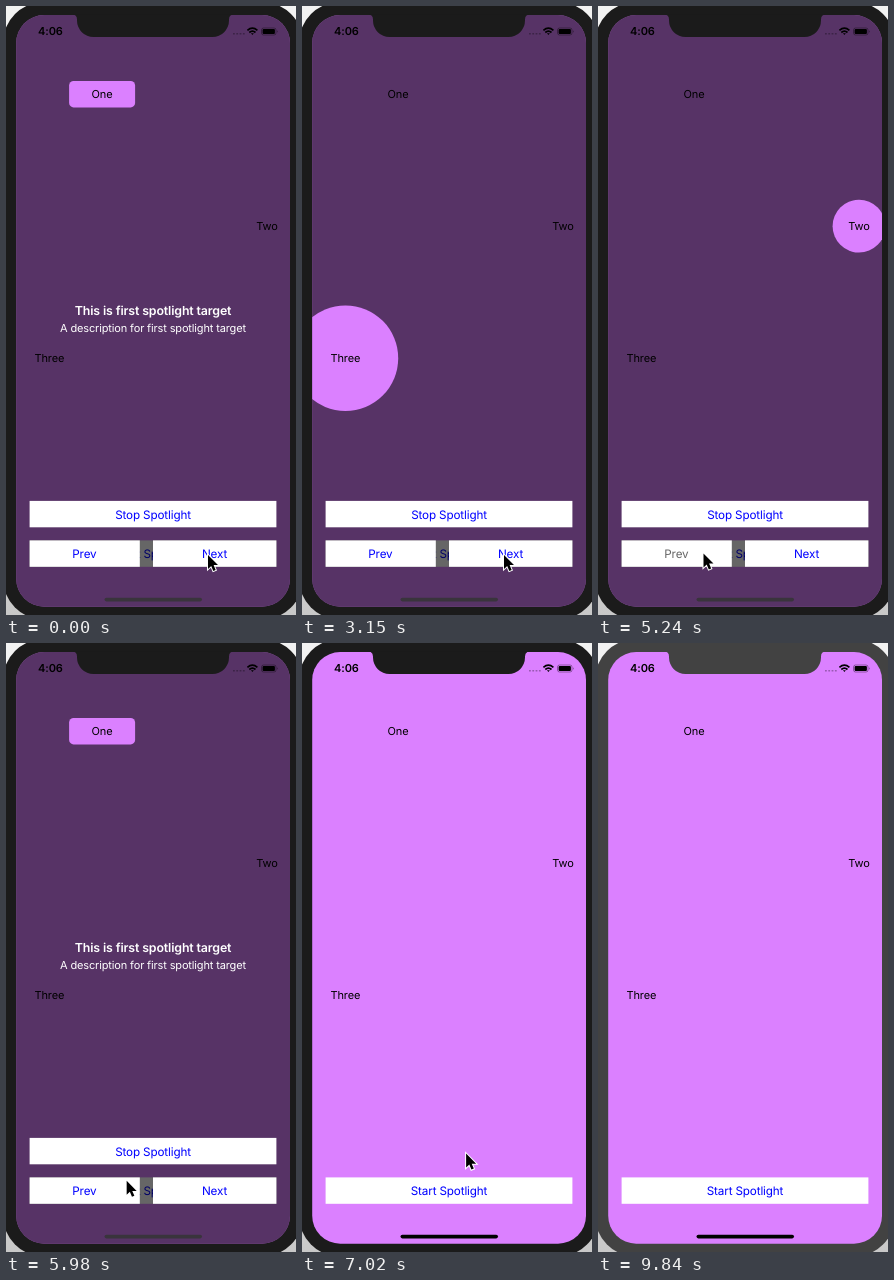
Recreate the animation shown at these times as an HTML page. Size 290 px wide and 609 px high, loop 9940 ms.

```html
<!DOCTYPE html>
<html lang="en">
<head>
<meta charset="utf-8">
<title>Spotlight tour</title>
<style>
  html, body { margin: 0; width: 100%; height: 100%; overflow: hidden; }
  body { background: linear-gradient(#f2f2f2 60%, #c8c8c8); }
  svg { display: block; width: 290px; height: 609px; }
  text { font: 11px Inter, Roboto, sans-serif; letter-spacing: -.14px; text-anchor: middle; text-rendering: geometricPrecision; }
  .button { font-size: 11.7px; fill: #00f; }
  .pressed { fill: #666; }
  .title { font-size: 12.4px; font-weight: 600; }
  .clock { font-weight: 600; }
</style>
</head>
<body>
<svg viewBox="0 0 290 609">
  <clipPath id="screen"><rect x="10.2" y="9" width="273.8" height="591.7" rx="28"/></clipPath>
  <rect id="bezel" x="-3" y="-4" width="300" height="617.5" rx="41"/>

  <g clip-path="url(#screen)">
    <rect width="290" height="609" fill="#db80ff"/>
    <rect x="23.6" y="534.4" width="246.8" height="26.4" fill="#fff"/>
    <text class="button" x="147" y="552.2">Start Spotlight</text>

    <g id="tour">
      <rect width="290" height="609" opacity=".6"/>
      <g fill="#db80ff">
        <rect id="spot1" x="63.1" y="75" width="66" height="26.4" rx="4.5"/>
        <circle id="spot2" cx="261" cy="220.2" r="26.4"/>
        <circle id="spot3" cx="43.4" cy="352.2" r="52.8"/>
      </g>
      <g id="caption" fill="#fff">
        <text class="title" x="147" y="309">This is first spotlight target</text>
        <text x="147" y="325.8">A description for first spotlight target</text>
      </g>
      <g fill="#fff">
        <rect x="23.6" y="494.9" width="246.8" height="26.4"/>
        <rect x="23.6" y="534.4" width="110.2" height="26.4"/>
        <rect x="147" y="534.4" width="123.4" height="26.4"/>
      </g>
      <text class="button" id="stop" x="147" y="512.5">Stop Spotlight</text>
      <text class="button" id="prev" x="78.4" y="552.2">Prev</text>
      <text class="button" id="next" x="208.5" y="552.2">Next</text>
    </g>

    <text x="96" y="92.3">One</text>
    <text x="261" y="224.2">Two</text>
    <text x="43.4" y="356.2">Three</text>
    <text class="clock" x="44.4" y="29.3">4:06</text>

    <path d="M227 27.7H239" stroke="#000" stroke-width="1.6" stroke-dasharray="1.8 1.5" opacity=".3"/>
    <g fill="none" stroke="#000" stroke-width="1.7">
      <path d="M241.4 24.4q5-4.4 10 0M243.3 26.5q3.1-2.6 6.2 0"/>
      <path d="M244.9 27.2h3l-1.5 1.7z" fill="#000" stroke="none"/>
    </g>
    <rect x="255.5" y="22" width="14.5" height="7" rx="2" fill="none" stroke="#000" stroke-width=".8" opacity=".45"/>
    <rect x="256.6" y="23" width="12.3" height="5" rx="1"/>
    <path d="M271 24.2q1.4 1.3 0 2.6z" opacity=".5"/>
    <rect id="home" x="98.5" y="591.8" width="97.5" height="3.6" rx="1.8"/>
  </g>

  <path id="notch" d="M66 8.5q5 0 5 5v1a16.5 16.5 0 0 0 16.5 16.5H206.5a16.5 16.5 0 0 0 16.5-16.5v-1q0-5 5-5z"/>
  <path id="cursor" d="M0 0V14L3.2 11 5.3 16 7.7 15 5.6 10.1H10z" stroke="#fff" stroke-width="2" paint-order="stroke"/>
</svg>
<script>
const LOOP = 9940, STEP = 150;
const el = id => document.getElementById(id);
const show = (id, on) => el(id).style.display = on ? '' : 'none';

// A tapped button is grey for one step, then the spotlight moves on.
const changes = [
  { time: 0, spot: 1 },
  { time: 1950, spot: 2, button: 'next' },
  { time: 3150, spot: 3 },
  { time: 4350, spot: 2 },
  { time: 5390, spot: 1, button: 'prev' },
  { time: 7020, spot: 0, button: 'stop' }
];

const smooth = p => p * p * (3 - 2 * p);
const cubic = p => p ** 3;
const home = [202, 549];
const moves = [
  { time: 3300, to: [105.5, 547.5], ease: smooth, dip: 4 },
  { time: 5680, to: [164, 510], ease: smooth, dip: 0 },
  { time: 6870, to: [190, 640], ease: cubic, dip: 0 }
];

// The pointer advances in six held steps per move.
function pointer(t) {
  let [x, y] = home;
  for (const { time, to, ease, dip } of moves) {
    const p = Math.min(6, Math.max(0, Math.floor((t - time) / STEP + .1))) / 6;
    x += (to[0] - x) * ease(p);
    y += (to[1] - y) * ease(p) + dip * Math.sin(Math.PI * p);
  }
  return [x, y];
}

function draw(t) {
  const { spot } = changes.findLast(c => c.time <= t);
  const pressed = changes.find(c => c.time > t && c.time - STEP <= t)?.button;
  show('tour', spot);
  show('caption', spot === 1);
  for (const n of [1, 2, 3]) show('spot' + n, spot === n);
  for (const id of ['stop', 'prev', 'next']) el(id).classList.toggle('pressed', id === pressed);
  el('home').setAttribute('fill', spot ? '#39343c' : '#000');
  el('cursor').setAttribute('transform', `translate(${pointer(t)})`);
  for (const id of ['bezel', 'notch']) el(id).setAttribute('fill', t < 9840 ? '#1b1b1b' : '#424242');
}

const start = performance.now();
function tick() {
  draw((performance.now() - start) % LOOP);
  requestAnimationFrame(tick);
}
tick();
</script>
</body>
</html>
```
